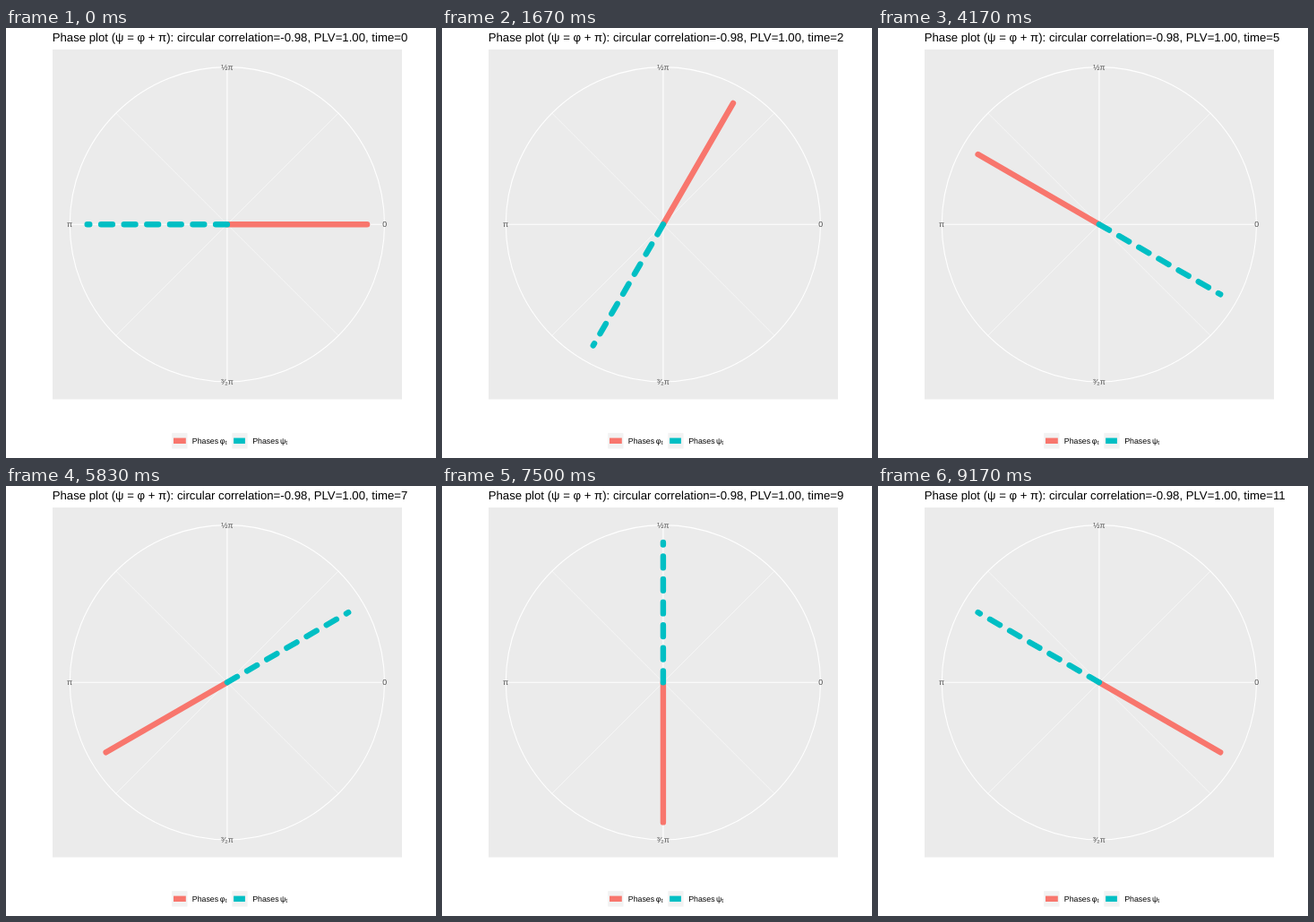
Write an HTML page that moves like this. It is 480 by 480 pixels and loops after 10000 ms.

```html
<!DOCTYPE html>
<html lang="en">
<head>
<meta charset="utf-8">
<title>Phase plot</title>
<style>
  html, body { margin: 0; width: 100%; height: 100%; overflow: hidden; background: #fff; }
  svg {
    display: block; width: 100vw; height: 100vh;
    font: 8.8px "Liberation Sans", Arial, sans-serif;
    text-rendering: geometricPrecision;
  }
  .title { font-size: 13.2px; }
  .grid { fill: none; stroke: #fff; stroke-width: 1.07; }
  .minor { stroke-width: .53; }
  .labels { fill: #4d4d4d; text-anchor: middle; }
  .sub { font-size: 6.6px; }
  .phi { stroke: #f8766d; }
  .psi { stroke: #00bfc4; }
  .phase { stroke-width: 6.4; }
  .hands { stroke-linecap: round; }
  .hands .psi { stroke-dasharray: 12.8; }
</style>
</head>
<body>
<svg viewBox="0 0 480 480">
  <text class="title" x="51.7" y="15">Phase plot (ψ = φ + π): circular correlation=-0.98, PLV=1.00, time=<tspan id="time">0</tspan></text>
  <rect x="52" y="24" width="390" height="390.5" fill="#ebebeb"/>

  <g transform="translate(246.9 219.2)">
    <g class="grid">
      <path class="minor" d="M-124.1-124.1 124.1 124.1M-124.1 124.1 124.1-124.1"/>
      <path d="M-175.6 0H175.6M0-175.6V175.6"/>
      <circle r="175.6"/>
    </g>
    <g id="hands" class="phase hands">
      <path class="phi" d="M0 0H156.2"/>
      <path class="psi" d="M0 0H-156.2"/>
    </g>
    <g class="labels">
      <text x="175.8" y="3.2">0</text>
      <text y="-172.4">½π</text>
      <text x="-175.8" y="3.2">π</text>
      <text y="178.8">³⁄₂π</text>
    </g>
  </g>

  <g fill="#f2f2f2">
    <rect x="185.2" y="452.2" width="17.3" height="17.3"/>
    <rect x="252.3" y="452.2" width="17.3" height="17.3"/>
  </g>
  <g class="phase">
    <path class="phi" d="M187 460.8h13.8"/>
    <path class="psi" d="M254.1 460.8h12.8"/>
  </g>
  <text x="207.8" y="464">Phases<tspan x="238.7">φ</tspan><tspan class="sub" x="244.8" y="465.3">t</tspan></text>
  <text x="275.2" y="464">Phases<tspan x="305.9">ψ</tspan><tspan class="sub" x="312.2" y="465.3">t</tspan></text>
</svg>
<script>
  const LOOP = 10000, STEPS = 12;
  const hands = document.getElementById("hands");
  const time = document.getElementById("time");
  const start = performance.now();

  // Steps begin at multiples of LOOP / STEPS, rounded to 10 ms.
  const stepStart = i => Math.round(i * LOOP / STEPS / 10) * 10;

  function draw(now) {
    const t = Math.max(0, now - start) % LOOP;
    let step = STEPS - 1;
    while (stepStart(step) > t) step--;
    hands.setAttribute("transform", `rotate(${-step * 360 / STEPS})`);
    time.textContent = step;
    requestAnimationFrame(draw);
  }
  draw(start);
</script>
</body>
</html>
```
